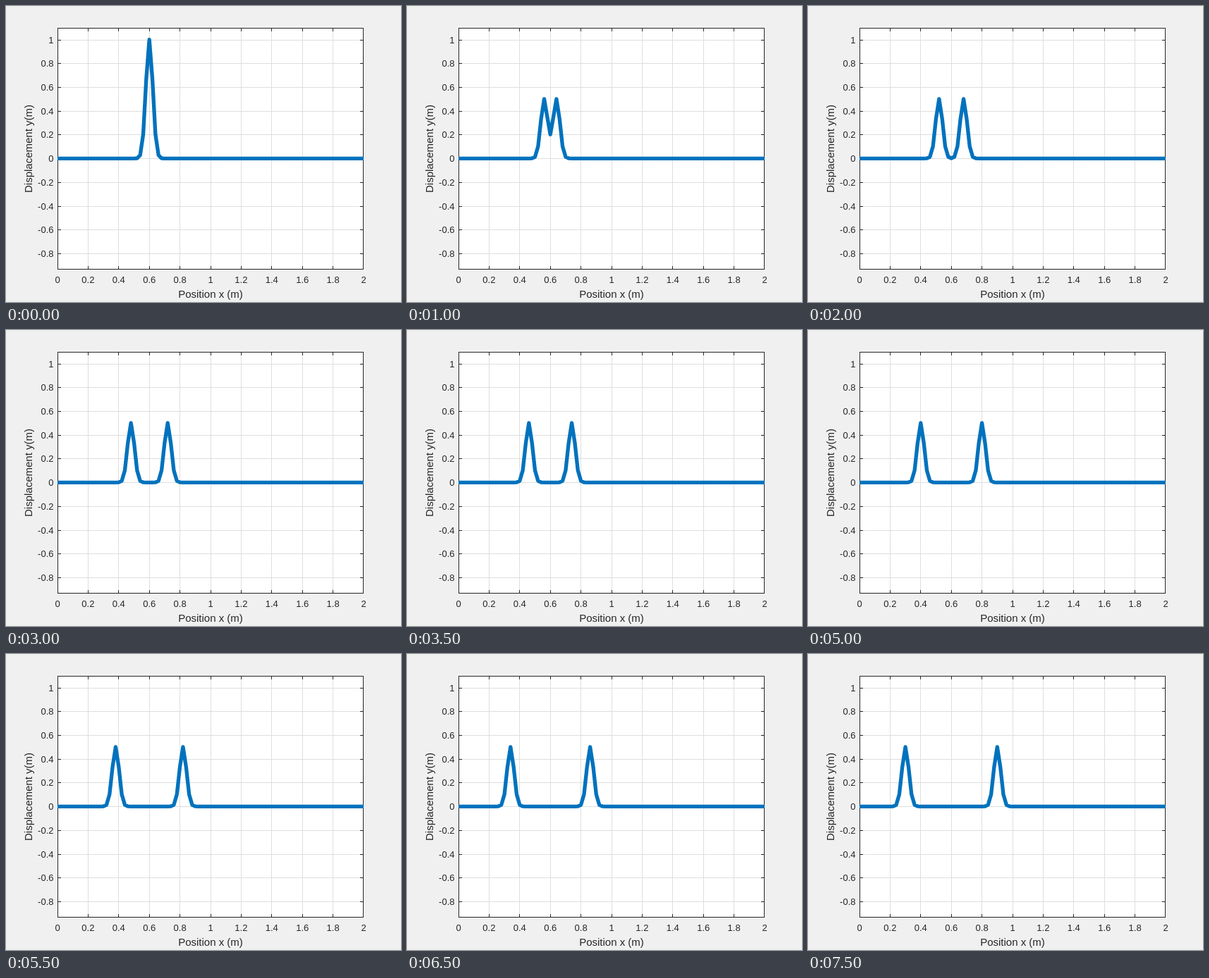
Recreate the animation shown at these times as an HTML page with a canvas. Size 560x420 px, loop 8 s.

```html
<!DOCTYPE html>
<html lang="en">
<head>
<meta charset="utf-8">
<title>Travelling pulses</title>
<style>
html, body { margin: 0; width: 100%; height: 100%; overflow: hidden; background: #f0f0f0; }
canvas { display: block; }
</style>
</head>
<body>
<canvas id="plot" width="560" height="420"></canvas>
<script>
const ctx = document.getElementById('plot').getContext('2d');
const FONT = '"Liberation Sans", Arial, sans-serif';
const INK = '#262626';
const LEFT = 73, RIGHT = 506, TOP = 31, BOTTOM = 373;
const STEP_MS = 500, STEPS = 16, DX = 0.02;

const px = x => 73 + 217 * x;
const py = y => 216.3 - 168.6 * y;
const xTicks = Array.from({ length: 11 }, (_, i) => i / 5);
const yTicks = Array.from({ length: 10 }, (_, i) => (i - 4) / 5);
const pulse = x => Math.exp(-1000 * x * x) / 2;

function text(str, x, y, size, align) {
  ctx.font = `${size}px ${FONT}`;
  ctx.textAlign = align;
  ctx.fillText(str, x, y);
}

function drawAxes() {
  ctx.fillStyle = '#f0f0f0';
  ctx.fillRect(0, 0, 560, 420);
  ctx.fillStyle = '#fff';
  ctx.fillRect(LEFT, TOP, RIGHT - LEFT + 1, BOTTOM - TOP + 1);

  const cols = xTicks.map(v => Math.min(RIGHT, Math.floor(px(v))));
  const rows = yTicks.map(v => Math.round(py(v) - 0.1));

  ctx.fillStyle = '#dedede';
  cols.forEach(x => ctx.fillRect(x, TOP, 1, BOTTOM - TOP));
  rows.forEach(y => ctx.fillRect(LEFT, y, RIGHT - LEFT, 1));

  ctx.fillStyle = INK;
  cols.forEach((x, i) => {
    ctx.fillRect(x, TOP, 1, 5);
    ctx.fillRect(x, BOTTOM - 4, 1, 5);
    text(String(xTicks[i]), px(xTicks[i]), 393, 13, 'center');
  });
  rows.forEach((y, i) => {
    ctx.fillRect(LEFT, y, 5, 1);
    ctx.fillRect(RIGHT - 4, y, 5, 1);
    text(String(yTicks[i]), 67.5, y + 5, 13, 'right');
  });
  ctx.strokeStyle = INK;
  ctx.lineWidth = 1;
  ctx.strokeRect(LEFT + 0.5, TOP + 0.5, RIGHT - LEFT, BOTTOM - TOP);

  text('Position x (m)', 290, 414, 15, 'center');
  ctx.save();
  ctx.translate(37, 202.5);
  ctx.rotate(-Math.PI / 2);
  text('Displacement y(m)', 0, 0, 15, 'center');
  ctx.restore();
}

function drawWave(step) {
  const shift = step * DX;
  ctx.beginPath();
  for (let i = 0; i <= 100; i++) {
    const x = i * DX;
    ctx.lineTo(px(x), py(pulse(x - 0.6 + shift) + pulse(x - 0.6 - shift)));
  }
  ctx.strokeStyle = '#0072bd';
  ctx.lineWidth = 5.33;
  ctx.lineJoin = 'round';
  ctx.stroke();
}

function frame() {
  drawAxes();
  drawWave(Math.floor(performance.now() / STEP_MS) % STEPS);
  requestAnimationFrame(frame);
}
frame();
</script>
</body>
</html>
```
